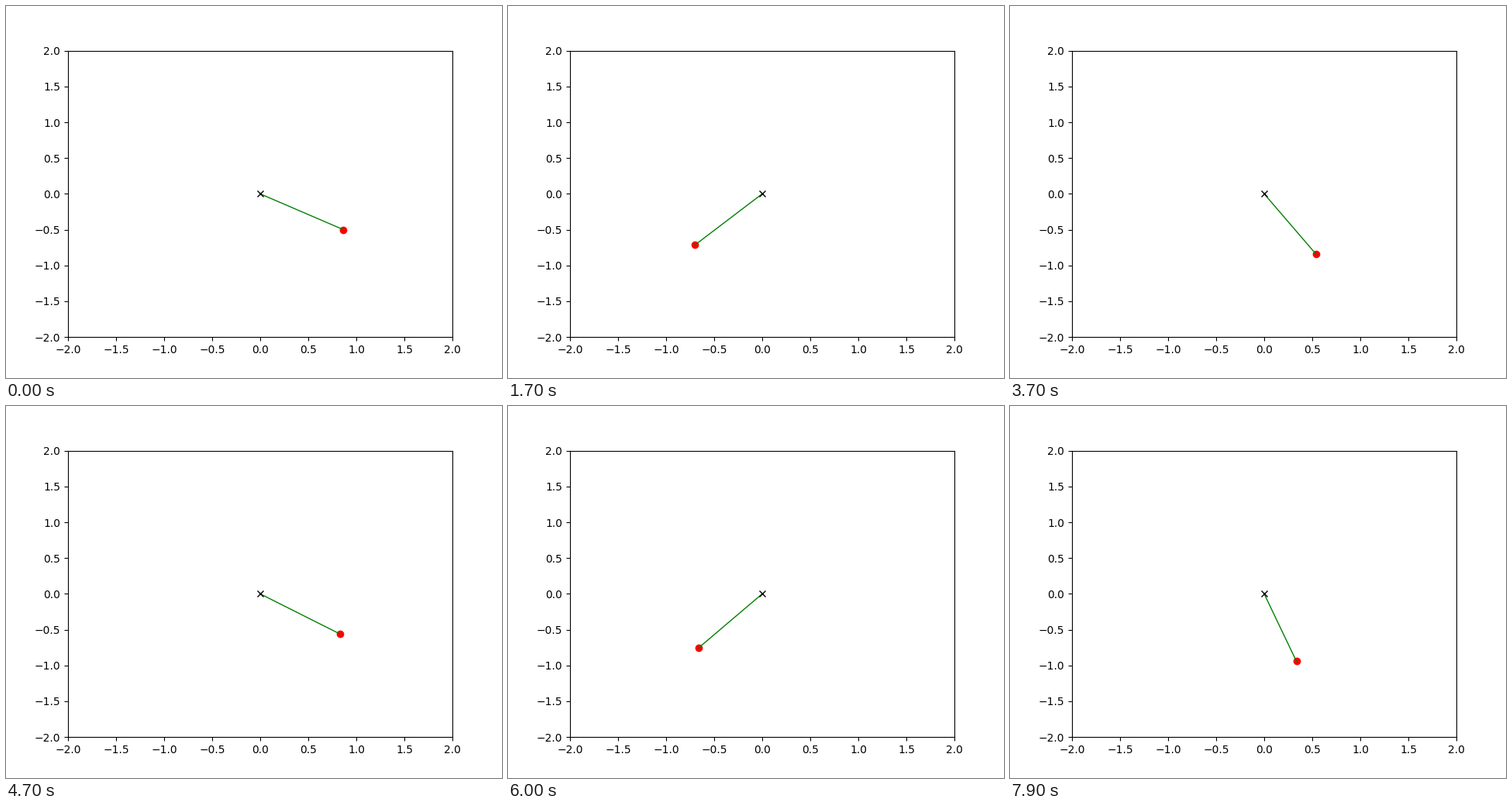
These frames come from a looping animation (640x480 px, 8000 ms). A matplotlib script:

```python
import math

import matplotlib.pyplot as plt
from matplotlib.animation import FuncAnimation

FRAMES = 80
INTERVAL = 100
PULL = 0.02398     # gravity / length * step squared
GAIN = 1.00066     # slight energy growth per step


def swing(start, count):
    """Angles of a pendulum released at rest, one per frame."""
    angle, speed = start, 0.0
    angles = []
    for _ in range(count):
        angles.append(angle)
        angle += speed
        speed = speed * GAIN - PULL * math.sin(angle)
    return angles


angles = swing(math.pi / 3, FRAMES)

fig, ax = plt.subplots(figsize=(6.4, 4.8), dpi=100)
ax.set_xlim(-2, 2)
ax.set_ylim(-2, 2)

bob, = ax.plot([], [], "ro")
rod, = ax.plot([], [], "g-", lw=1)
pivot, = ax.plot([0], [0], "kx")


def draw(i):
    x, y = math.sin(angles[i]), -math.cos(angles[i])
    rod.set_data([0, x], [0, y])
    bob.set_data([x], [y])
    return bob, rod


anim = FuncAnimation(fig, draw, frames=FRAMES, interval=INTERVAL,
                     init_func=lambda: draw(0), repeat=True, repeat_delay=0)

plt.show()
```
